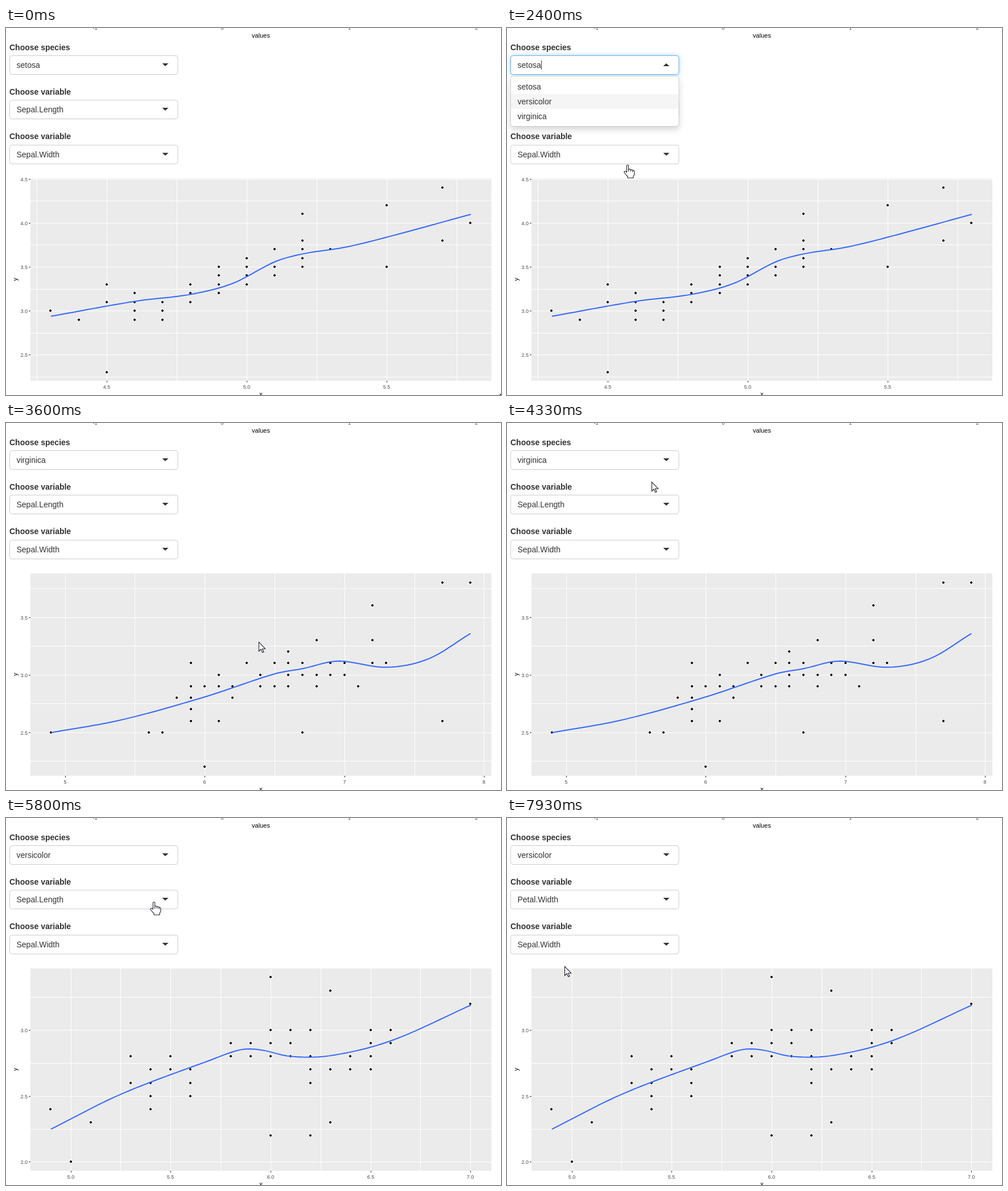
These frames come from a looping animation (870 px wide and 644 px high, 8000 ms). An HTML page with a canvas:

```html
<!DOCTYPE html>
<html lang="en">
<head>
<meta charset="utf-8">
<style>
html, body { margin: 0; width: 100%; height: 100%; overflow: hidden; background: #fff; }
canvas { display: block; }
</style>
</head>
<body>
<canvas id="stage" width="870" height="644"></canvas>
<script>
const ctx = document.getElementById('stage').getContext('2d');
const LOOP = 8000, TRAVEL = 470, BLINK = 530, ROW = 26;
const FONT = 'Arial, "Liberation Sans", sans-serif';
const PANEL = { left: 43, right: 853, top: 264, bottom: 619 };

// Axis: value `at` sits on pixel `px`; `unit` is pixels per unit, `step` the major break.
// `knots` shape the trend; `outliers` are fixed, other points scatter around the trend.
const plots = [
  {
    start: 0, count: 37, from: 4.4, to: 5.4, spread: .35,
    x: { at: 4.5, px: 177.3, unit: 492, step: .5 },
    y: { at: 4.5, px: 265.3, unit: -154.2, step: .5 },
    knots: [[4.3, 2.94], [4.6, 3.11], [4.8, 3.19], [4.95, 3.315], [5.1, 3.56],
      [5.2, 3.65], [5.35, 3.725], [5.5, 3.84], [5.8, 4.1]],
    outliers: [[4.3, 3], [4.5, 2.3], [5.2, 4.1], [5.5, 3.5], [5.5, 4.2], [5.7, 3.8], [5.7, 4.4], [5.8, 4]]
  },
  {
    start: 3470, count: 43, from: 5.6, to: 7.5, spread: .4,
    x: { at: 5, px: 104, unit: 245.6, step: 1 },
    y: { at: 3.5, px: 341, unit: -202.3, step: .5 },
    knots: [[4.9, 2.5], [5.4, 2.61], [6, 2.81], [6.5, 3.01], [6.7, 3.055],
      [6.95, 3.12], [7.3, 3.067], [7.6, 3.14], [7.9, 3.36]],
    outliers: [[4.9, 2.5], [5.7, 2.5], [6, 2.2], [6.7, 2.5], [7.2, 3.6], [7.7, 2.6], [7.7, 3.8], [7.9, 3.8]]
  },
  {
    start: 5600, count: 43, from: 5.1, to: 6.8, spread: .35,
    x: { at: 5, px: 114, unit: 351.4, step: .5 },
    y: { at: 3, px: 372.5, unit: -231.4, step: .5 },
    knots: [[4.9, 2.25], [5.25, 2.515], [5.7, 2.775], [5.85, 2.853], [5.95, 2.851],
      [6.1, 2.802], [6.3, 2.808], [6.6, 2.92], [7, 3.19]],
    outliers: [[4.9, 2.4], [5, 2], [6, 2.2], [6, 3.4], [6.2, 2.2], [6.3, 2.3], [6.3, 3.3], [7, 3.2]]
  }
];

const species = ['setosa', 'versicolor', 'virginica'];
const variables = ['Sepal.Length', 'Sepal.Width', 'Petal.Length', 'Petal.Width'];
const selects = [
  { label: 'Choose species', options: species, value: 0 },
  { label: 'Choose variable', options: variables, value: 0 },
  { label: 'Choose variable', options: variables, value: 1 }
].map((s, i) => ({ ...s, top: Math.round(48 + 78.3 * i), baseline: Math.floor(39 + 78.3 * i) }));

// hover: [time, highlighted row]; the last row is taken on closing.
const menus = [
  { select: 0, open: 1930, close: 2930, hover: [[1930, 0], [2070, 1], [2600, 2]] },
  { select: 0, open: 4530, close: 5270, hover: [[4530, 2], [5000, 1]] },
  { select: 1, open: 6800, close: 7870, hover: [[6800, 0], [7500, 3]] }
];

// Pointer stops: [arrival time, x, y]; it rests until TRAVEL ms before the next arrival.
const stops = [[0, 868, 642], [450, 480, 400], [870, 99, 162], [1200, 56, 219], [1470, 289, 64],
  [2130, 264, 124], [2400, 212, 240], [2670, 28, 150], [3330, 92, 151], [3670, 486, 412],
  [4330, 254, 103], [4530, 217, 56], [5130, 28, 128], [5330, 60, 206], [5800, 260, 147],
  [7670, 100, 258], [7930, 101, 260]];

const arrow = new Path2D('M.5 .5V16.5L4.2 13 6.7 18.6 9 17.6 6.6 12.2H11.7Z');
const hand = new Path2D('M-1.6 13V1.8Q-1.6 .5 0 .5T1.6 1.8V8Q5 7 5.4 9Q8.5 8 9 10Q12 9.3 12 12V15' +
  'Q12 18 10 20V23H0V20.5Q-3 17.5-6 13.5Q-6.3 11-4 11.2ZM1.6 8v4M5.4 9v3M9 10v3');

const current = (list, t, time) => list.filter(item => time(item) <= t).pop();
const toPixel = (axis, value) => axis.px + (value - axis.at) * axis.unit;

// Cubic Hermite curve through the knots, with secant slopes.
function trend(knots, x) {
  const last = knots.length - 1;
  const slope = i => {
    const a = knots[Math.max(i - 1, 0)], b = knots[Math.min(i + 1, last)];
    return (b[1] - a[1]) / (b[0] - a[0]);
  };
  let i = 0;
  while (i < last - 1 && x > knots[i + 1][0]) i++;
  const [x0, y0] = knots[i], [x1, y1] = knots[i + 1];
  const h = x1 - x0, u = (x - x0) / h, v = 1 - u;
  return y0 * v * v * (1 + 2 * u) + y1 * u * u * (1 + 2 * v) +
    h * u * v * (slope(i) * v - slope(i + 1) * u);
}

// Distinct points on a grid of tenths, densest in the middle and near the trend.
function scatter({ count, from, to, spread, knots, outliers }) {
  let seed = 20011;
  const random = () => (seed = seed * 16807 % 2147483647) / 2147483647;
  const key = (x, y) => x.toFixed(1) + ' ' + y.toFixed(1);
  const keys = new Set(outliers.map(([x, y]) => key(x, y)));
  while (keys.size < count) {
    const x = Math.round((from + (to - from) * (random() + random()) / 2) * 10) / 10;
    keys.add(key(x, trend(knots, x) + spread * (random() + random() - 1)));
  }
  return [...keys].map(k => k.split(' ').map(Number));
}
plots.forEach(plot => plot.points = scatter(plot));

function text(str, x, y, size, color, align = 'left', weight = '') {
  ctx.font = `${weight} ${size}px ${FONT}`;
  ctx.fillStyle = color;
  ctx.textAlign = align;
  ctx.fillText(str, x, y);
}

function rect(color, x, y, w, h) {
  ctx.fillStyle = color;
  ctx.fillRect(x, y, w, h);
}

function box(y, h, stroke, shadow) {
  ctx.save();
  ctx.beginPath();
  ctx.roundRect(6.5, y + .5, 295.5, h, 4);
  if (shadow) [ctx.shadowColor, ctx.shadowBlur, ctx.shadowOffsetY] = shadow;
  ctx.fillStyle = '#fff';
  ctx.fill();
  ctx.restore();
  ctx.strokeStyle = stroke;
  ctx.lineWidth = 1;
  ctx.stroke();
}

function eachBreak(axis, low, high, draw) {
  const half = axis.step / 2;
  for (let i = 0; i * half < 10; i++) {
    const p = Math.floor(toPixel(axis, i * half));
    if (p >= low && p < high) draw(p, i % 2 ? null : (i * half).toFixed(axis.step < 1 ? 1 : 0));
  }
}

function drawPlot({ x, y, points, knots }) {
  const { left, right, top, bottom } = PANEL;
  rect('#ebebeb', left, top, right - left, bottom - top);
  eachBreak(x, left, right, (p, label) => {
    rect('#fff', p, top, 1, bottom - top);
    if (!label) return;
    rect('#333', p, bottom, 1, 3);
    text(label, p, 633, 9, '#4d4d4d', 'center');
  });
  eachBreak(y, top, bottom, (p, label) => {
    rect('#fff', left, p, right - left, 1);
    if (!label) return;
    rect('#333', left - 3, p, 3, 1);
    text(label, 38, p + 4, 9, '#4d4d4d', 'right');
  });

  for (const point of points) {
    const px = Math.floor(toPixel(x, point[0])), py = Math.floor(toPixel(y, point[1]));
    rect('#000', px - 2, py - 1, 4, 2);
    rect('#000', px - 1, py - 2, 2, 4);
  }

  ctx.beginPath();
  const first = knots[0][0], width = knots.at(-1)[0] - first;
  for (let i = 0; i <= 80; i++) {
    const value = first + width * i / 80;
    ctx.lineTo(toPixel(x, value), toPixel(y, trend(knots, value)));
  }
  ctx.strokeStyle = '#36f';
  ctx.lineWidth = 2;
  ctx.stroke();

  text('x', 448, 646, 11, '#000', 'center');
  ctx.save();
  ctx.translate(20, 441);
  ctx.rotate(-Math.PI / 2);
  text('y', 0, 0, 11, '#000', 'center');
  ctx.restore();
}

function drawSelect({ label, top, baseline, options }, value, isOpen, caretOn) {
  text(label, 6, baseline, 14, '#333', 'left', 'bold');
  box(top, 33, isOpen ? '#66afe9' : '#ccc', isOpen && ['rgba(102,175,233,.6)', 8, 0]);
  text(options[value], 18.5, top + 22, 14, '#333');
  if (caretOn) rect('#333', Math.round(19 + ctx.measureText(options[value]).width), top + 9, 1, 16);
  const middle = top + 16.5, half = isOpen ? -2.5 : 2.5;
  ctx.beginPath();
  ctx.moveTo(274.5, middle - half);
  ctx.lineTo(285.5, middle - half);
  ctx.lineTo(280, middle + half);
  ctx.fillStyle = '#333';
  ctx.fill();
}

function drawMenu({ top, options }, active) {
  const y = top + 36;
  box(y, options.length * ROW + 10, '#d0d0d0', ['rgba(0,0,0,.18)', 12, 5]);
  options.forEach((name, i) => {
    if (i === active) rect('#f5f5f5', 7, y + 6 + i * ROW, 294, ROW);
    text(name, 18.5, y + 24 + i * ROW, 14, '#333');
  });
}

function drawPointer(t, menuOpen) {
  const next = stops.findIndex(stop => stop[0] > t);
  const [t1, x1, y1] = stops.at(next);
  const [t0, x0, y0] = next > 0 ? stops[next - 1] : stops.at(-1);
  const travel = Math.min(TRAVEL, t1 - t0);
  const u = next > 0 ? Math.max(0, 1 - (t1 - t) / travel) : 1;
  const ease = u * u * (3 - 2 * u);
  const x = Math.round(x0 + (x1 - x0) * ease), y = Math.round(y0 + (y1 - y0) * ease);
  const onSelect = x > 6 && x < 302 && selects.some(s => y >= s.top && y < s.top + 34);
  const shape = menuOpen || onSelect ? hand : arrow;
  ctx.save();
  ctx.translate(x, y);
  ctx.fillStyle = '#fff';
  ctx.fill(shape);
  ctx.strokeStyle = '#1c1c28';
  ctx.lineWidth = 1.1;
  ctx.stroke(shape);
  ctx.restore();
}

function draw(t) {
  rect('#fff', 0, 0, 870, 644);
  for (let n = -1; n <= 2; n++) text(n, 380 + n * 223.4, 3, 9, '#4d4d4d', 'center');
  text('values', 448, 17, 11, '#000', 'center');
  drawPlot(current(plots, t, p => p.start));

  const menu = menus.find(m => t >= m.open && t < m.close);
  selects.forEach((s, i) => {
    const done = current(menus.filter(m => m.select === i), t, m => m.close);
    const isOpen = menu?.select === i;
    const caretOn = isOpen && (t - menu.open) % (2 * BLINK) < BLINK;
    drawSelect(s, done ? done.hover.at(-1)[1] : s.value, isOpen, caretOn);
  });
  if (menu) drawMenu(selects[menu.select], current(menu.hover, t, h => h[0])[1]);
  drawPointer(t, !!menu);
}

const begin = performance.now();
function tick() {
  draw((performance.now() - begin) % LOOP);
  requestAnimationFrame(tick);
}
tick();
</script>
</body>
</html>
```
